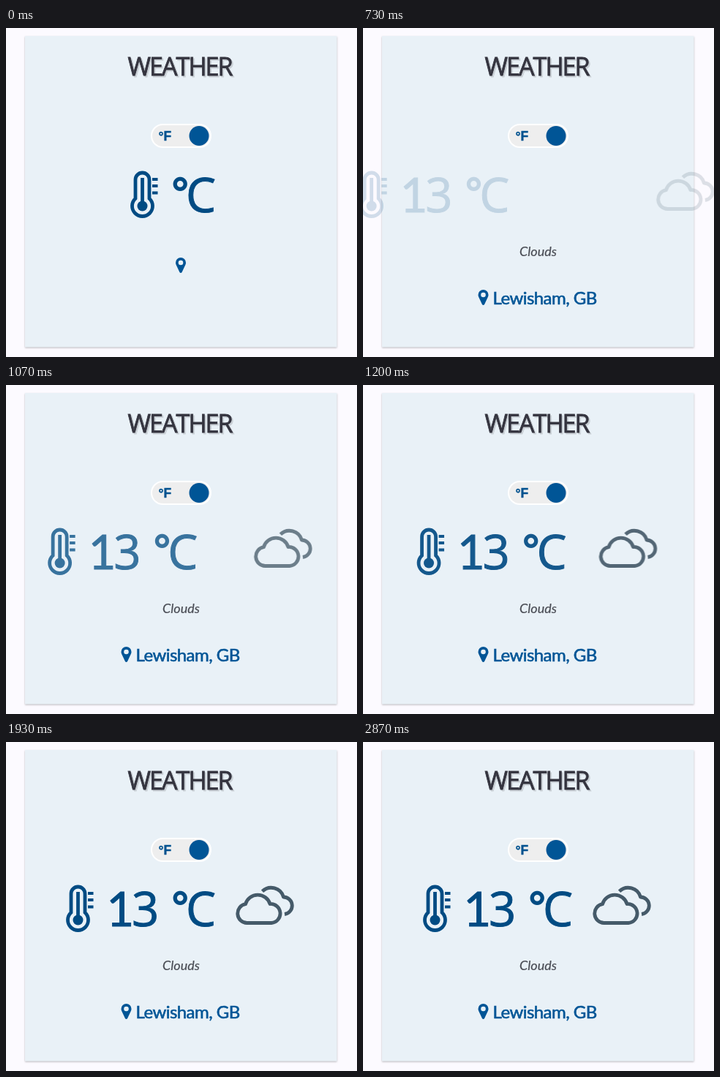
An HTML page without scripts for the animation above (3070 ms loop, 480 px wide and 450 px high).

```html
<!DOCTYPE html>
<html lang="en">
<head>
<meta charset="utf-8">
<title>Weather</title>
<style>
  html, body { margin: 0; width: 100%; height: 100%; overflow: hidden; background: #fcfaff; }
  svg { display: block; width: 480px; height: 450px; }
  text { font-family: Lato, "Open Sans", sans-serif; white-space: pre; }

  .card { fill: #e9f1f7; filter: drop-shadow(0 1px 1px #0004); }
  .title {
    font: 34px "Open Sans", "Noto Sans", sans-serif; font-kerning: none; letter-spacing: -1.95px;
    fill: #34343f; stroke: #34343f; stroke-width: .8;
    filter: drop-shadow(2px 2px .5px #0002);
  }
  .pill { fill: #eee; stroke: #fff; stroke-width: 2; }
  .unit { font: bold 17.5px "Liberation Sans", Arial, sans-serif; fill: #00528f; stroke: #00528f; stroke-width: .4; }
  .blue { fill: #005596; }
  .degrees { font-size: 65px; fill: #004b83; stroke: #004b83; stroke-width: 1; }
  .humanist { font-family: "Open Sans", "Noto Sans", sans-serif; }
  .ring { font-size: 57px; font-weight: bold; stroke: none; }
  .outline { fill: none; stroke-width: 4.8; }
  .thermo { stroke: #004b83; }
  .bulb { fill: #004b83; stroke: none; }
  .clouds { stroke: #455a69; stroke-linejoin: round; }
  .sky { font-size: 18px; font-style: italic; fill: #4a4d55; stroke: #4a4d55; stroke-width: .2; }
  .place { font-size: 24px; letter-spacing: -.55px; fill: #005596; stroke: #005596; stroke-width: .6; }

  .loading, .loaded, .slide { animation: 3070ms infinite; }
  .loading { animation-name: leave; animation-timing-function: step-end; }
  .loaded { animation-name: arrive; animation-timing-function: step-end; }
  .slide { animation-name: slide; animation-timing-function: linear; }
  .left { --side: -1px; }
  .right { --side: 1px; }

  @keyframes leave { 0% { visibility: visible; } 15.3%, 100% { visibility: hidden; } }
  @keyframes arrive { 0% { visibility: hidden; } 15.3%, 100% { visibility: visible; } }
  @keyframes slide {
    0%, 16.29% { transform: translateX(calc(104 * var(--side))); opacity: 0; }
    19.54% { transform: translateX(calc(101 * var(--side))); opacity: .03; }
    23.78% { transform: translateX(calc(87 * var(--side))); opacity: .17; }
    30.29% { transform: translateX(calc(53 * var(--side))); opacity: .5; }
    34.85% { transform: translateX(calc(25 * var(--side))); opacity: .76; }
    39.09% { transform: translateX(calc(8.5 * var(--side))); opacity: .92; }
    43.32% { transform: translateX(calc(1 * var(--side))); opacity: .99; }
    47.88%, 100% { transform: none; opacity: 1; }
  }
</style>
</head>
<body>
<svg viewBox="0 0 480 450">
  <defs>
    <g id="thermo" class="outline thermo">
      <path d="M-9.5 233.2V207.5a9.5 9.5 0 0 1 19 0V233.2A14 14 0 1 1-9.5 233.2z"/>
      <path d="M0 205V242"/>
      <circle class="bulb" cy="243.5" r="7"/>
      <path stroke-width="4" d="M13.5 207h7.5m-7.5 9h7.5m-7.5 9.5h7.5"/>
    </g>
    <path id="pin" class="blue" fill-rule="evenodd" d="M0 21c-.8 0-1.3-.4-1.6-1L-6.3 10C-6.8 9-7 8-7 7a7 7 0 0 1 14 0c0 1-.2 2-.7 3L1.6 20c-.3.6-.8 1-1.6 1zM-3.3 7a3.3 3.3 0 0 0 6.6 0a3.3 3.3 0 0 0-6.6 0z"/>
    <text id="celsius" class="degrees humanist"><tspan class="ring" x="226" y="245">°</tspan><tspan x="246" y="251.5">C</tspan></text>
  </defs>

  <rect class="card" x="26" y="11" width="426.5" height="425.5"/>
  <text class="title" x="166.5" y="65">WEATHER</text>

  <rect class="pill" x="199" y="132" width="81" height="31" rx="15.5"/>
  <text class="unit" x="208.5" y="153.5">°F</text>
  <circle class="blue" cx="264" cy="147.5" r="13.5"/>

  <g class="loading">
    <use href="#thermo" x="186.5"/>
    <use href="#celsius"/>
    <use href="#pin" x="239" y="314"/>
  </g>

  <g class="loaded">
    <g class="slide left">
      <use href="#thermo" x="98.5"/>
      <text class="degrees" x="137.5" y="251.5">1<tspan class="humanist" x="172">3</tspan></text>
      <use href="#celsius"/>
    </g>
    <g class="slide right">
      <g class="outline clouds">
        <path d="M329.5 247.5a13 13 0 0 1-2-25.8A17.5 17.5 0 0 1 361 221.5A13 13 0 0 1 363 247.5z"/>
        <path d="M350.5 204.3A17.5 17.5 0 0 1 379.5 212A11.8 11.8 0 0 1 381 235.5"/>
      </g>
    </g>
    <text class="sky" x="214" y="312">Clouds</text>
    <use href="#pin" x="164.5" y="358"/>
    <text class="place" x="177.5" y="377.5">Lewisham, GB</text>
  </g>
</svg>
</body>
</html>
```
